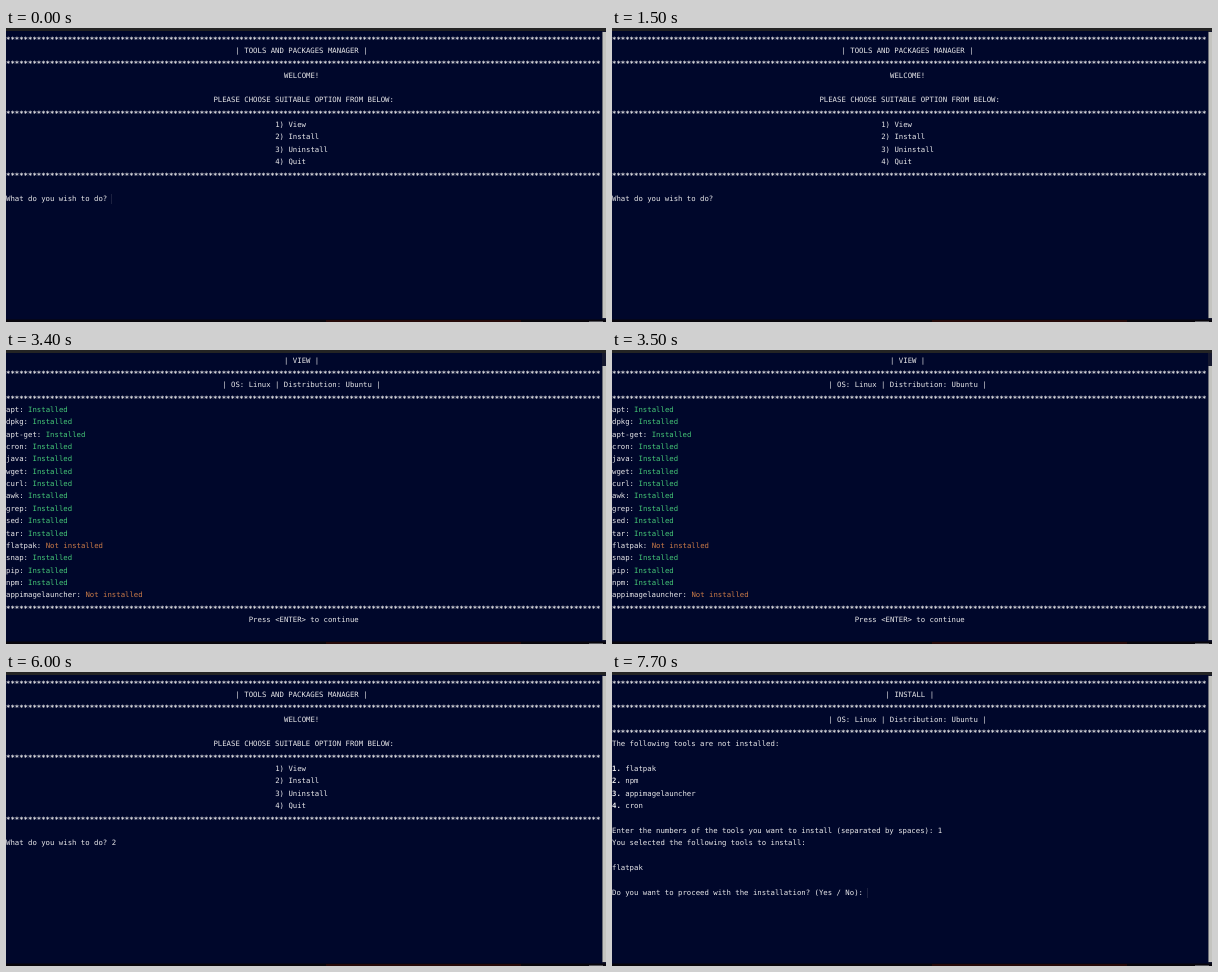
Animation, 600 px wide and 294 px high, one loop 8 s. Source, as an HTML page with a canvas:

```html
<!DOCTYPE html>
<html lang="en">
<head>
<meta charset="utf-8">
<title>Tools and packages manager</title>
<style>
html, body { margin: 0; width: 100%; height: 100%; overflow: hidden; background: #00072b; }
canvas { display: block; }
</style>
</head>
<body>
<canvas id="stage" width="600" height="294"></canvas>
<script>
const ctx = document.getElementById('stage').getContext('2d');
const LOOP = 8000, COLS = 135, CELL = 4.413, ROW = 12.36, BASE = 12.5;
const FONT = `${CELL / 0.60205}px "DejaVu Sans Mono", monospace`;
const TEXT = '#e8e8ea', GREEN = '#45c878', ORANGE = '#c87a48';
const MENU_PROMPT = 'What do you wish to do? ';
const INSTALL_PROMPT = 'Enter the numbers of the tools you want to install (separated by spaces): ';
const OS_LINE = '| OS: Linux | Distribution: Ubuntu |';
const CONFIRM = 'Do you want to proceed with the installation? (Yes / No): ';
const TOOLS = ['apt', 'dpkg', 'apt-get', 'cron', 'java', 'wget', 'curl', 'awk', 'grep', 'sed',
  'tar', 'flatpak', 'snap', 'pip', 'npm', 'appimagelauncher'];
const MISSING = ['flatpak', 'appimagelauncher'];

function rect(x, y, w, h, color) {
  ctx.fillStyle = color;
  ctx.fillRect(x, y, w, h);
}

function put(row, text, { col = 0, color = TEXT, bold = false, dy = 0 } = {}) {
  ctx.font = (bold ? 'bold ' : '') + FONT;
  ctx.fillStyle = color;
  ctx.fillText(text, col * CELL, BASE + row * ROW + dy);
}

function center(row, text) {
  put(row, text, { col: Math.floor((COLS - text.length) / 2) });
}

function stars(...rows) {
  for (const row of rows) put(row, '*'.repeat(COLS), { bold: true, dy: 1.1 });
}

function cursor(row, col, height = 10) {
  rect(Math.floor(col * CELL), Math.round(BASE + row * ROW - 7), 1, height, '#1c2140');
}

function windowFrame(thumbTop) {
  rect(0, 0, 600, 294, '#00072b');
  rect(0, 0, 600, 3, '#242424');
  rect(596, 3, 4, 288.5, '#15182f');
  rect(596.5, thumbTop, 3.5, 290 - thumbTop, '#c4c4c0');
  rect(0, 291.5, 600, 2.5, '#08060c');
  rect(320, 292, 195, 2, '#260a09');
  rect(583, 293, 14, 1, '#55555a');
}

function menu(typed, cursorHeight) {
  windowFrame(4);
  stars(0, 2, 6, 11);
  center(1, '| TOOLS AND PACKAGES MANAGER |');
  center(3, 'WELCOME!');
  center(5, 'PLEASE CHOOSE SUITABLE OPTION FROM BELOW:');
  ['View', 'Install', 'Uninstall', 'Quit'].forEach((name, i) => put(7 + i, `${i + 1}) ${name}`, { col: 61 }));
  put(13, MENU_PROMPT + typed);
  if (cursorHeight) cursor(13, MENU_PROMPT.length, cursorHeight);
}

function view() {
  windowFrame(16);
  center(0, '| VIEW |');
  stars(1, 3, 20);
  center(2, OS_LINE);
  TOOLS.forEach((name, i) => {
    const missing = MISSING.includes(name);
    put(4 + i, name + ':');
    put(4 + i, missing ? 'Not installed' : 'Installed',
      { col: name.length + 2, color: missing ? ORANGE : GREEN });
  });
  center(21, 'Press <ENTER> to continue');
}

function install(typed, showCursor, confirmed) {
  windowFrame(4);
  stars(0, 2, 4);
  center(1, '| INSTALL |');
  center(3, OS_LINE);
  put(5, 'The following tools are not installed:');
  ['flatpak', 'npm', 'appimagelauncher', 'cron'].forEach((name, i) => {
    put(7 + i, `${i + 1}.`, { bold: true });
    put(7 + i, name, { col: 3 });
  });
  put(12, INSTALL_PROMPT + typed);
  if (showCursor) cursor(12, INSTALL_PROMPT.length);
  if (!confirmed) return;
  put(13, 'You selected the following tools to install:');
  put(15, 'flatpak');
  put(17, CONFIRM);
  cursor(17, CONFIRM.length);
}

// Each entry: start time in ms and the screen shown from then on.
const timeline = [
  [0, () => menu('', 10)],
  [300, () => menu('', 0)],
  [900, () => menu('', 3)],
  [1500, () => menu('', 0)],
  [2100, () => menu('', 3)],
  [2700, () => menu('1', 0)],
  [3400, view],
  [5500, () => menu('', 10)],
  [6000, () => menu('2', 0)],
  [6400, () => install('', true)],
  [6900, () => install('', false)],
  [7300, () => install('1', false)],
  [7700, () => install('1', false, true)]
];

function frame(now) {
  const t = now % LOOP;
  ctx.textRendering = 'geometricPrecision';
  timeline.findLast(([start]) => start <= t)[1]();
  requestAnimationFrame(frame);
}

frame(0);
</script>
</body>
</html>
```
